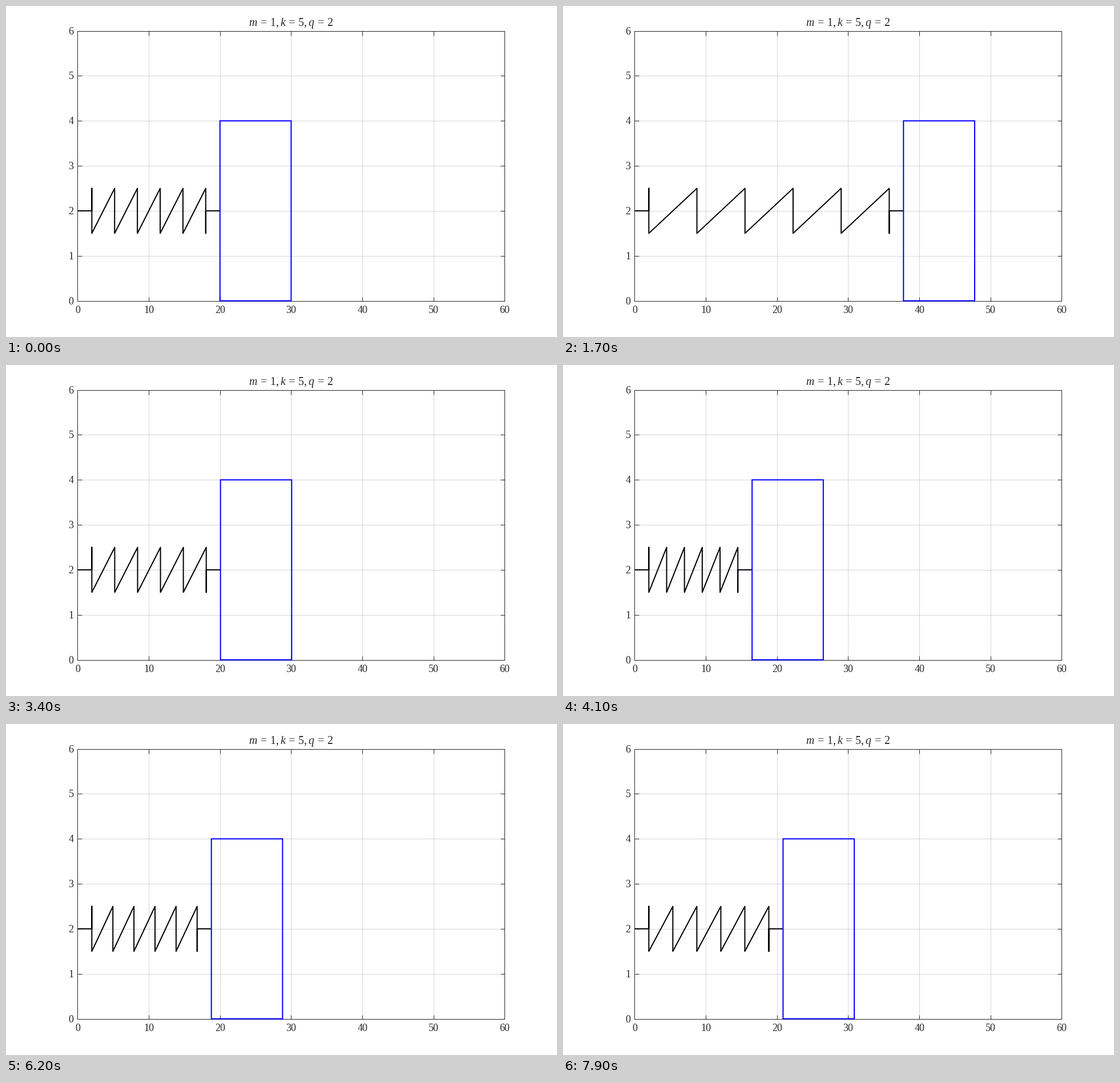
Animation of 965x580 px, one loop 8000 ms. Source, as a matplotlib script:

```python
import numpy as np
import matplotlib.pyplot as plt
from matplotlib.animation import FuncAnimation
from matplotlib.patches import Rectangle

W, H, DPI = 965, 580, 100
PX = 72 / DPI                      # one pixel in points
# just short of pixel centres, so hairlines snap down and left
LEFT, RIGHT, TOP, BOTTOM = 125.4, 873.4, 43.6, 516.6
INK = "#262626"

M, K, Q = 1, 5, 2                  # mass, stiffness, damping
REST, PEAK = 20, 20
DT = 0.04607
FRAMES, STEP = 80, 100

plt.rcParams.update({
    "font.family": "Liberation Serif",
    "mathtext.fontset": "custom",
    "mathtext.rm": "Liberation Serif",
    "mathtext.it": "Liberation Serif:italic",
})

decay = Q / (2 * M)
omega = np.sqrt(K / M - decay**2)


def swing(t):
    return np.exp(-decay * t) * np.sin(omega * t)


AMP = PEAK / swing(np.arctan2(omega, decay) / omega)


def spring_path(end, teeth=5, lead=2, mid=2, half=0.5):
    """Two straight leads with a sawtooth between them."""
    edges = np.linspace(lead, end - lead, teeth + 1)
    xs = np.concatenate([[0, lead], np.repeat(edges, 2), [end - lead, end]])
    ys = np.concatenate([[mid, mid],
                         np.tile([mid + half, mid - half], teeth + 1),
                         [mid, mid]])
    return xs, ys


fig = plt.figure(figsize=(W / DPI, H / DPI), dpi=DPI, facecolor="white")
ax = fig.add_axes([LEFT / W, 1 - BOTTOM / H, (RIGHT - LEFT) / W, (BOTTOM - TOP) / H])
ax.set(xlim=(0, 60), ylim=(0, 6), xticks=range(0, 61, 10), yticks=range(7))
ax.set_axisbelow(True)
ax.grid(color=INK, alpha=0.18, linewidth=PX)
ax.tick_params(direction="in", top=True, right=True, length=7.5 * PX, width=PX,
               color=INK, labelbottom=False, labelleft=False)
for side in ax.spines.values():
    side.set(color=INK, linewidth=PX)


def label(x, y, text, size=18, ha="center", color=INK):
    fig.text(x / W, 1 - y / H, text, fontsize=size * PX, ha=ha,
             va="baseline", color=color)


for v in range(0, 61, 10):
    label(LEFT + v * (RIGHT - LEFT) / 60, 538, str(v))
for v in range(7):
    label(118.5, BOTTOM - v * (BOTTOM - TOP) / 6 + 6, str(v), ha="right")

eq = r"\hspace{0.22}=\hspace{0.22}"
label(499.5, 35, rf"$m{eq}{M}, k{eq}{K}, q{eq}{Q}$", size=19.8, color=INK)

spring, = ax.plot([], [], color="black", linewidth=2 * PX, zorder=5,
                  solid_joinstyle="round", solid_capstyle="butt", clip_on=False)
block = Rectangle((REST, 0), 10, 4, fill=False, edgecolor="blue", snap=False,
                  linewidth=2 * PX, zorder=6, clip_on=False)
ax.add_patch(block)


def update(i):
    x = REST + AMP * swing(i * DT)
    spring.set_data(*spring_path(x))
    block.set_x(x)
    return spring, block


anim = FuncAnimation(fig, update, frames=FRAMES, interval=STEP,
                     init_func=lambda: update(0), repeat=True, repeat_delay=0)
plt.show()
```
